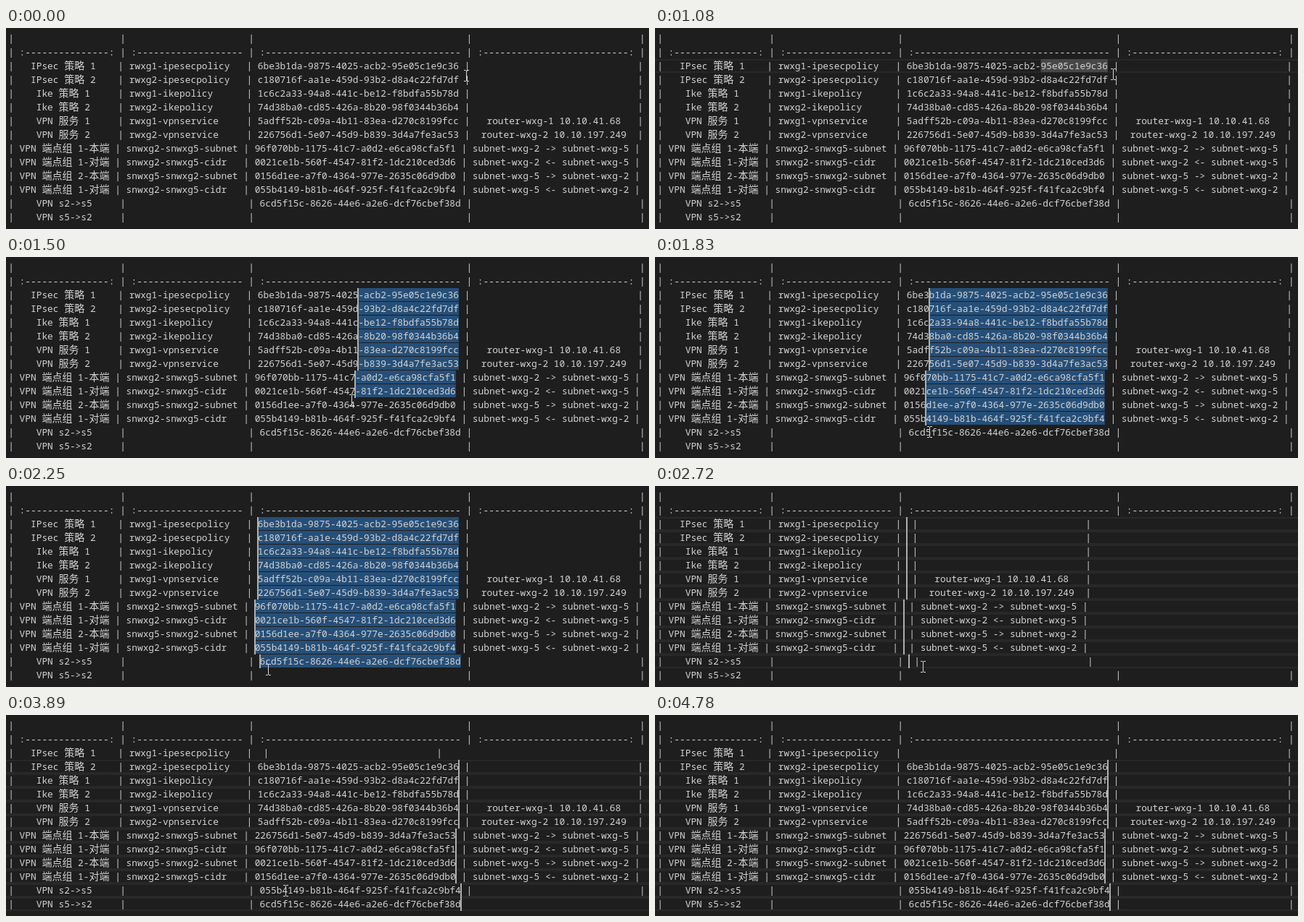
An HTML page with a canvas that plays this animation: 886x278 px, repeating every 5.02 s.

```html
<!DOCTYPE html>
<html lang="zh">
<head>
<meta charset="utf-8">
<title>Column editing in a table</title>
<style>
  html, body { margin: 0; width: 100%; height: 100%; overflow: hidden; background: #1e1e1e; }
  canvas { display: block; width: 886px; height: 278px; }
</style>
</head>
<body>
<canvas></canvas>
<script>
(() => {
const W = 886, H = 278, LOOP = 5020;
const CELL = 7.698, LINE = 19, LEFT = 3.2, TOP = 5, BASE = 14, WIDE = 14;
const MONO = '12.83px "Noto Sans Mono", monospace';
const HAN = '14px "Noto Sans CJK SC", "Noto Sans CJK", sans-serif';
const FIRST = 2, COUNT = 11, ID = 36;

// Moments of the editing steps, in ms
const CLICK = 470, HIGHLIGHT = 720, DRAG = 1085, CUT = 2580, DOWN = 3230, PASTE = 3700, FORMAT = 4220;

const table = [
  ['', '', ''],
  [':' + '-'.repeat(15) + ':', ':' + '-'.repeat(19), ':' + '-'.repeat(26) + ':'],
  ['IPsec 策略 1', 'rwxg1-ipesecpolicy', ''],
  ['IPsec 策略 2', 'rwxg2-ipesecpolicy', ''],
  ['Ike 策略 1', 'rwxg1-ikepolicy', ''],
  ['Ike 策略 2', 'rwxg2-ikepolicy', ''],
  ['VPN 服务 1', 'rwxg1-vpnservice', 'router-wxg-1 10.10.41.68'],
  ['VPN 服务 2', 'rwxg2-vpnservice', 'router-wxg-2 10.10.197.249'],
  ['VPN 端点组 1-本端', 'snwxg2-snwxg5-subnet', 'subnet-wxg-2 -> subnet-wxg-5'],
  ['VPN 端点组 1-对端', 'snwxg2-snwxg5-cidr', 'subnet-wxg-2 <- subnet-wxg-5'],
  ['VPN 端点组 2-本端', 'snwxg5-snwxg2-subnet', 'subnet-wxg-5 -> subnet-wxg-2'],
  ['VPN 端点组 1-对端', 'snwxg2-snwxg5-cidr', 'subnet-wxg-5 <- subnet-wxg-2'],
  ['VPN s2->s5', '', ''],
  ['VPN s5->s2', '', '']
];
const ids = `6be3b1da-9875-4025-acb2-95e05c1e9c36
c180716f-aa1e-459d-93b2-d8a4c22fd7df
1c6c2a33-94a8-441c-be12-f8bdfa55b78d
74d38ba0-cd85-426a-8b20-98f0344b36b4
5adff52b-c09a-4b11-83ea-d270c8199fcc
226756d1-5e07-45d9-b839-3d4a7fe3ac53
96f070bb-1175-41c7-a0d2-e6ca98cfa5f1
0021ce1b-560f-4547-81f2-1dc210ced3d6
0156d1ee-a7f0-4364-977e-2635c06d9db0
055b4149-b81b-464f-925f-f41fca2c9bf4
6cd5f15c-8626-44e6-a2e6-dcf76cbef38d`.split('\n');

// [time, x, y] of the pointer and [time, rows, column] of the selection
const pointerPath = [[0, 634, 66], [280, 634, 66], [330, 633, 67], [470, 633, 66], [800, 631, 64],
  [1085, 631, 64], [1500, 476, 198], [1830, 378, 242], [2250, 361, 254], [CUT, 361, 254],
  [3000, 385, 243], [FORMAT, 385, 243], [4500, 385, 300]];
const selectionPath = [[DRAG, 1.2, 36], [1500, 8.2, 18.2], [1830, 10.4, 4.2], [2250, 11.2, 0]];

const isWide = ch => ch > '\u2e80';
const cells = s => [...s].reduce((n, ch) => n + (isWide(ch) ? 2 : 1), 0);
const textWidth = s => [...s].reduce((n, ch) => n + (isWide(ch) ? WIDE : CELL), 0);
const blank = n => ' '.repeat(n);
function center(s, size) {
  const pad = size - cells(s), before = pad >> 1;
  return blank(before) + s + blank(pad - before);
}
const rows = table.map(([label, name, note]) => {
  const head = `| ${center(label, 17)} | ${name.padEnd(20)} | `;
  return { head, tail: ` | ${center(note, 28)} |`, x: LEFT + textWidth(head) };
});
const rowTop = row => TOP + row * LINE;

function along(path, t) {
  const i = path.findIndex(p => p[0] > t);
  if (i < 0) return path[path.length - 1].slice(1);
  if (i === 0) return path[0].slice(1);
  const a = path[i - 1], b = path[i], k = (t - a[0]) / (b[0] - a[0]);
  return [1, 2].map(n => a[n] + (b[n] - a[n]) * k);
}

function idCell(row, t) {
  if (row === 0) return blank(ID);
  if (row === 1) return ':' + '-'.repeat(ID - 1);
  const n = row - FIRST;
  if (t < CUT) return ids[n] || blank(ID);
  if (t < PASTE) return n < COUNT ? '' : blank(ID);
  if (n === 0) return t < FORMAT ? '' : blank(ID);
  return ids[n - 1] + (n === COUNT && t < FORMAT ? blank(ID) : '');
}

// Which rows hold a caret, and at which column
function carets(t) {
  if (t < CLICK) return { from: FIRST, count: 0, col: 0 };
  if (t < DRAG) return { from: FIRST, count: 1, col: ID, hidden: t > 940 };
  if (t < CUT) {
    const [count, col] = along(selectionPath, t).map(Math.floor);
    return { from: FIRST, count, col, selected: true };
  }
  return { from: FIRST + (t >= DOWN), count: COUNT, col: t < PASTE ? 0 : ID };
}

const canvas = document.querySelector('canvas'), ctx = canvas.getContext('2d');
const ratio = window.devicePixelRatio || 1;
canvas.width = W * ratio;
canvas.height = H * ratio;
ctx.scale(ratio, ratio);

function box(color, x, y, w, h) {
  ctx.fillStyle = color;
  ctx.fillRect(x, y, w, h);
}

function drawText(s, x, y) {
  for (const ch of s) {
    const wide = isWide(ch);
    if (ch !== ' ') {
      ctx.font = wide ? HAN : MONO;
      ctx.fillText(ch, x, y);
    }
    x += wide ? WIDE : CELL;
  }
}

function drawPointer(t) {
  const [x, y] = along(pointerPath, t).map(Math.round);
  for (const edge of [y - 8, y + 7]) {
    box('#d8d8d8', x - 3, edge, 3, 1);
    box('#d8d8d8', x + 1, edge, 3, 1);
  }
  box('#d8d8d8', x, y - 7, 1, 14);
}

function draw(t) {
  box('#1e1e1e', 0, 0, W, H);
  const c = carets(t), end = c.from + c.count;

  for (let r = c.from; r < end; r++) {
    const x = rows[r].x;
    if (c.selected) {
      box('#264f78', x + c.col * CELL, rowTop(r), (ID - c.col) * CELL, LINE - 1);
    } else {
      box('#282828', 0, rowTop(r), W, 2);
      box('#282828', 0, rowTop(r) + LINE - 2, W, 2);
    }
  }
  if (t >= HIGHLIGHT && t < DRAG) {
    box('#474747', rows[FIRST].x + 24 * CELL, rowTop(FIRST), 12 * CELL, LINE - 1);
  }

  ctx.fillStyle = '#d4d4d4';
  rows.forEach((row, r) => drawText(row.head + idCell(r, t) + row.tail, LEFT, rowTop(r) + BASE));

  if (!c.hidden) {
    for (let r = c.from; r < end; r++) {
      box('#aeafad', Math.round(rows[r].x + c.col * CELL) - 1, rowTop(r), 2, LINE);
    }
  }
  drawPointer(t);
}

const start = performance.now();
function tick() {
  draw((performance.now() - start) % LOOP);
  requestAnimationFrame(tick);
}
tick();
})();
</script>
</body>
</html>
```
